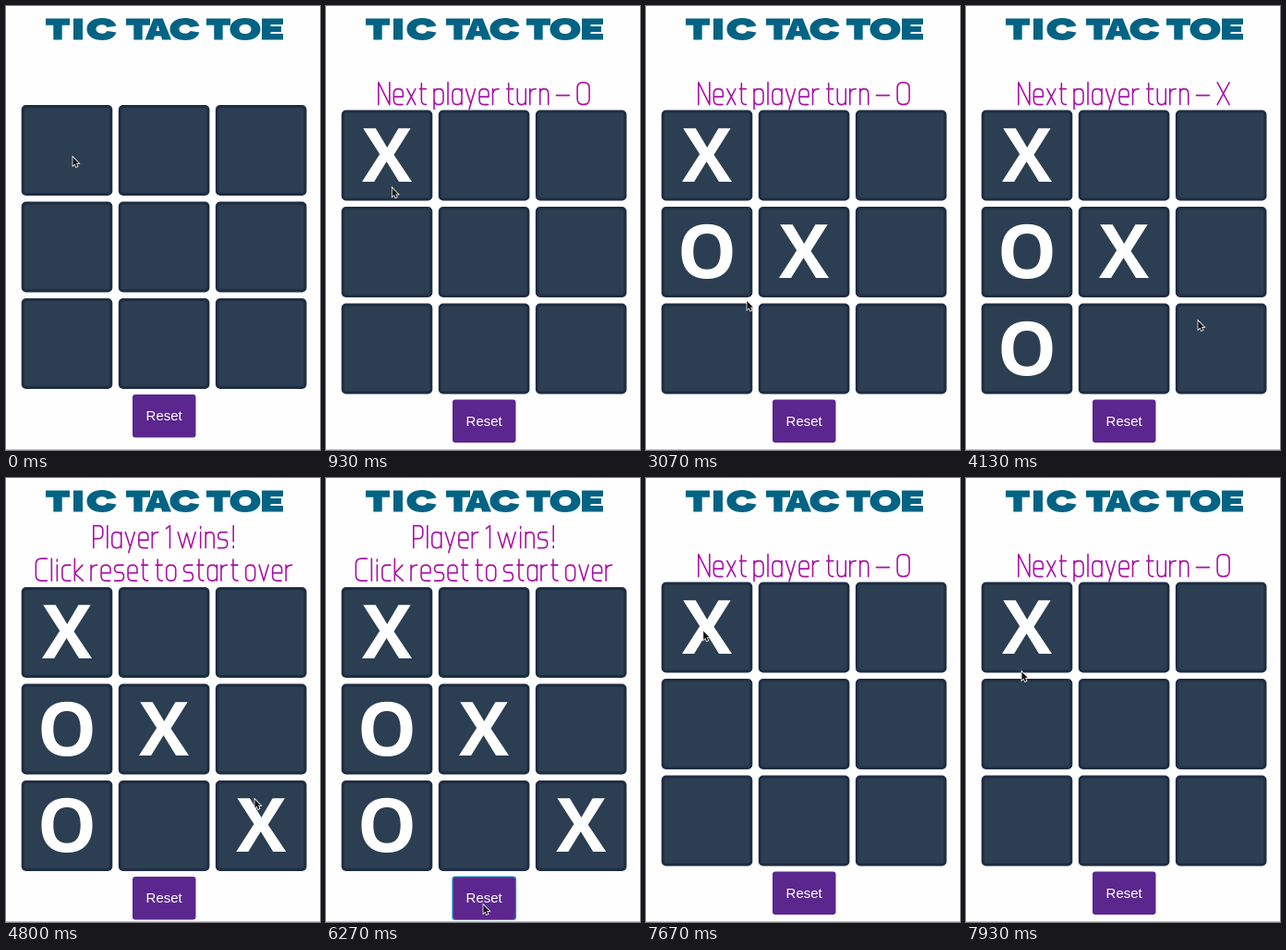
An HTML page with a canvas that plays this animation: 340x480 px, repeating every 8000 ms.

```html
<!DOCTYPE html>
<html lang="en">
<head>
<meta charset="utf-8">
<title>Tic Tac Toe</title>
<style>
  html, body { margin: 0; width: 100%; height: 100%; overflow: hidden; background: #fefefe; }
  canvas { display: block; width: 340px; height: 480px; }
</style>
</head>
<body>
<canvas id="stage" role="img" aria-label="TIC TAC TOE"></canvas>
<script>
const LOOP = 8000, STEP = 1000 / 15;
const canvas = document.getElementById('stage');
const ctx = canvas.getContext('2d');
const ratio = window.devicePixelRatio || 1;
canvas.width = 340 * ratio;
canvas.height = 480 * ratio;

// Wide heavy capitals, top at 0, bottom at 23
const heavy = {
  T: 'M0 0H26V7.3H17.7V23H8.3V7.3H0Z',
  I: 'M0 0H10V23H0Z',
  C: 'M32 15C30 20 25 23.5 17 23.5C7 23.5 0 19 0 11.5S7 -.5 17 -.5C25 -.5 30 3 32 8L22 9.5' +
     'C21 8 19.5 6.8 17 6.8C13 6.8 10 8.5 10 11.5S13 16.2 17 16.2C19.5 16.2 21 15 22 13.5Z',
  A: 'M0 23L9.3 0H19.2L28.5 23H18.7L17.4 19H10.4L9.2 23ZM12 13.5H15.9L14 7.2Z',
  O: 'M0 11.5C0 4 7 -.5 16.5 -.5S33 4 33 11.5S26 23.5 16.5 23.5S0 19 0 11.5Z' +
     'M10 11.5C10 14.5 12.5 16.5 16.5 16.5S23 14.5 23 11.5S20.5 6.5 16.5 6.5S10 8.5 10 11.5Z',
  E: 'M0 0H23V6.5H9.5V8.5H21V14.5H9.5V16.5H23V23H0Z'
};
const title = 'TICTACTOE';
const titleX = [43, 73, 87.5, 130, 150.5, 177.5, 217, 242.5, 277];

// Thin monoline letters: advance width and stroke, baseline at 0
const BOWL = 'Q0 -17 5 -17T10 -12V-5Q10 0 5 0T0 -5';
const thin = {
  N: [12, 'M0 0V-24L12 0V-24'],
  X: [13, 'M0 0L13 -24M0 -24L13 0'],
  O: [13, 'M0 -18Q0 -24 6.5 -24T13 -18V-6Q13 0 6.5 0T0 -6Z'],
  P: [10, 'M0 0V-24H5Q10 -24 10 -19V-15Q10 -10 5 -10H0'],
  C: [12, 'M12 -24H6Q0 -24 0 -18V-6Q0 0 6 0H12'],
  1: [4, 'M0 -21L4 -24V0'],
  '–': [14, 'M0 -10H14'],
  '!': [3, 'M2 -24V-7M2 -2V0'],
  a: [10, 'M10 0V-17M10 -12Q10 -17 5 -17T0 -12V-5Q0 0 5 0T10 -5'],
  c: [9, 'M9 -17H5Q0 -17 0 -12V-5Q0 0 5 0H9'],
  e: [10, 'M0 -8.5H10V-12Q10 -17 5 -17T0 -12V-5Q0 0 5 0H9.5'],
  i: [2, 'M1 0V-17M1 -23V-21'],
  k: [9, 'M0 0V-24M8.5 -17L0 -8L9 0'],
  l: [1, 'M.5 0V-24'],
  n: [9, 'M0 0V-17M0 -12Q0 -17 4.5 -17T9 -12V0'],
  o: [10, 'M0 -12' + BOWL + 'Z'],
  p: [10, 'M0 5V-17M0 -12' + BOWL],
  r: [6.5, 'M0 0V-17M0 -11Q0 -17 6.5 -17'],
  s: [10, 'M9.5 -17H4Q0 -17 0 -13T4 -9H6Q10 -9 10 -4.5T6 0H0'],
  t: [7, 'M2 -23V-4.5Q2 0 7 0M0 -17H7'],
  u: [9, 'M0 -17V-5Q0 0 4.5 0T9 -5M9 -17V0'],
  v: [10, 'M0 -17L5 0L10 -17'],
  w: [19, 'M0 -17L5 0L9.5 -16L14 0L19 -17'],
  x: [9, 'M0 -17L9 0M9 -17L0 0'],
  y: [10, 'M0 -17L5.2 -1M10 -17L3.5 5']
};
const GAP = 4.5, SPACE = 8.7;

// [time, cell, mark]
const moves = [[470, 0, 'X'], [1800, 3, 'O'], [2670, 4, 'X'], [3600, 6, 'O'], [4670, 8, 'X']];
const RESET = 6330, PRESS = 6200, REPLAY = 7670;

// [time, x, y]
const track = [
  [0, 72, 163], [670, 72, 163], [1330, 70, 258], [2000, 70, 258], [2470, 170, 262],
  [2600, 170, 262], [3470, 60, 364], [3540, 60, 364], [4130, 251, 340], [4400, 265, 343],
  [4530, 269, 347], [5140, 269, 347], [6000, 170, 461], [6400, 170, 461],
  [6930, 123, 195], [7400, 62, 160], [7600, 62, 160], [7930, 60, 209], [8100, 60, 209]
];

function paint(x, y, draw) {
  ctx.save();
  ctx.translate(x, y);
  draw();
  ctx.restore();
}

function box(x, y, w, h, r, color) {
  ctx.fillStyle = color;
  ctx.beginPath();
  ctx.roundRect(x, y, w, h, r);
  ctx.fill();
}

function drawTitle() {
  ctx.fillStyle = '#036384';
  [...title].forEach((ch, i) =>
    paint(titleX[i], 13.5, () => ctx.fill(new Path2D(heavy[ch]), 'evenodd')));
}

function lineWidth(text) {
  return text.split(' ').reduce((sum, word) =>
    sum + SPACE + [...word].reduce((w, ch) => w + thin[ch][0] + GAP, -GAP), -SPACE);
}

function drawLine(text, baseline) {
  let x = 171 - lineWidth(text) / 2;
  ctx.strokeStyle = '#a812a4';
  ctx.lineWidth = 1.6;
  ctx.lineCap = ctx.lineJoin = 'round';
  for (const ch of text) {
    if (ch === ' ') {
      x += SPACE - GAP;
      continue;
    }
    const [w, path] = thin[ch];
    paint(x, baseline - 0.9, () => ctx.stroke(new Path2D(path)));
    x += w + GAP;
  }
}

function drawBoard(top, played) {
  for (let i = 0; i < 9; i++) {
    const x = 16.7 + 105.1 * (i % 3), y = top + 104.5 * Math.floor(i / 3);
    box(x, y, 98.6, 98, 5, '#1f2d43');
    box(x + 3, y + 3, 92.6, 92, 3, '#2b3e52');
  }
  ctx.fillStyle = '#fff';
  ctx.textAlign = 'center';
  ctx.font = '700 81px "Open Sans", "Noto Sans", sans-serif';
  for (const [, i, mark] of played) {
    ctx.fillText(mark, 66 + 105.1 * (i % 3), top + 77.3 + 104.5 * Math.floor(i / 3));
  }
}

function drawButton(y, pressed) {
  box(137, y, 68.5, 46.5, 3, '#5b268e');
  if (pressed) {
    ctx.strokeStyle = '#1795c4';
    ctx.lineWidth = 1.2;
    ctx.stroke();
  }
  ctx.fillStyle = '#fff';
  ctx.font = '15px "Liberation Sans", Arial, sans-serif';
  ctx.fillText('Reset', 171.2, y + 28.3);
}

function cursorAt(t) {
  const i = track.findIndex(k => k[0] > t);
  const [t0, x0, y0] = track[i - 1], [t1, x1, y1] = track[i];
  const p = (t - t0) / (t1 - t0), e = p * p * (3 - 2 * p);
  return [x0 + (x1 - x0) * e, y0 + (y1 - y0) * e];
}

function drawCursor(t) {
  const [x, y] = cursorAt(t);
  paint(x, y, () => {
    const arrow = new Path2D('M.4 .4V9.6L2.5 7.7L3.9 11L5.5 10.3L4.1 7.1H6.9Z');
    ctx.strokeStyle = '#fff';
    ctx.lineWidth = 1.5;
    ctx.lineJoin = 'miter';
    ctx.stroke(arrow);
    ctx.fillStyle = '#111';
    ctx.fill(arrow);
  });
}

function draw(t) {
  const played = t < RESET ? moves.filter(m => m[0] <= t) : t < REPLAY ? [] : [moves[0]];
  const won = played.length === moves.length;
  const top = won ? 118 : played.length ? 112.5 : 107;

  ctx.setTransform(ratio, 0, 0, ratio, 0, 0);
  ctx.fillStyle = '#fefefe';
  ctx.fillRect(0, 0, 340, 480);
  ctx.fillStyle = '#c6c6c6';
  ctx.fillRect(0, 479, 340, 1);
  drawTitle();
  if (won) {
    drawLine('Player 1 wins!', 76.5);
    drawLine('Click reset to start over', 112);
  } else if (played.length) {
    drawLine('Next player turn – ' + 'XO'[played.length % 2], 107.5);
  }
  drawBoard(top, played);
  drawButton(top + 313, t >= PRESS && t < RESET);
  drawCursor(Math.floor((t + 5) / STEP) * STEP);
}

function frame() {
  draw(performance.now() % LOOP);
  requestAnimationFrame(frame);
}
frame();
</script>
</body>
</html>
```
